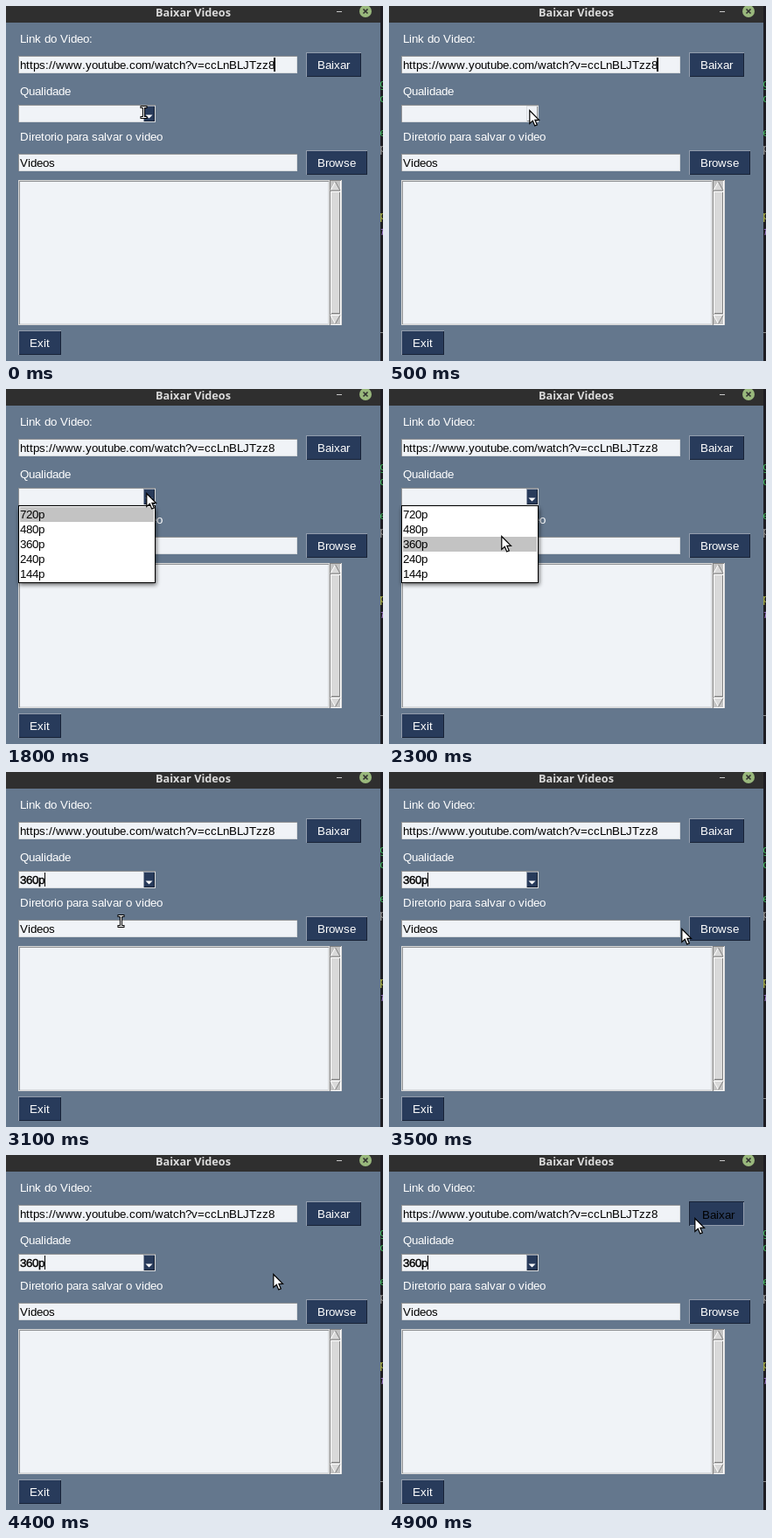
These frames come from a looping animation (431 px wide and 406 px high, 8000 ms). An HTML page:

```html
<!DOCTYPE html>
<html lang="pt">
<head>
<meta charset="utf-8">
<title>Baixar Videos</title>
<style>
html, body { margin: 0; width: 100%; height: 100%; overflow: hidden; background: #64778d; }
svg { display: block; width: 431px; height: 406px; }
rect, .edge { shape-rendering: crispEdges; }
text { font: 13.333px "Liberation Sans", Arial, sans-serif; fill: #000; white-space: pre; }
.label text, .button text { fill: #fff; }
.title { font: 700 12.7px "Noto Sans", "Open Sans", sans-serif; fill: #dadada; text-anchor: middle; }
.code text { font: 13px "DejaVu Sans Mono", monospace; fill: #3fae5a; }
.code .grey { fill: #9a9a9a; }
.code .olive { fill: #b5bd4c; }
.code .purple { fill: #9d78c9; font-style: italic; }
.field rect { fill: #f0f3f7; }
.button rect { fill: #283b5b; }
.edge { fill: none; stroke-width: 1; }
.dark { stroke: #909294; }
.light { stroke: #d8dbde; }
.navy-light { stroke: #939dad; }
.navy-dark { stroke: #182337; }
.bar-light { stroke: #fff; }
.bar-dark { stroke: #828282; }

/* One loop is 8 s, so 100 ms is 1.25%. */
.anim { animation: 8s step-end infinite; }
#pointer { animation-name: move; }
#beam { animation-name: beam; }
#arrow { animation-name: arrow; }
#urlCaret { animation-name: urlCaret; }
#comboCaret { animation-name: comboCaret; }
#comboHover { animation-name: comboHover; }
#chosen { animation-name: chosen; }
#menu { animation-name: menu; }
#row { animation-name: row; }
#exitText { animation-name: exitText; }
#loadText { animation-name: loadText; }
#pressed { animation-name: pressed; }

@keyframes move {
  0% { transform: translate(157px, 121px); }
  1.25% { transform: translate(158px, 118px); }
  2.5% { transform: translate(160px, 118px); }
  26.25% { transform: translate(154px, 131px); }
  27.5% { transform: translate(141px, 150px); }
  28.75% { transform: translate(128px, 167px); }
  38.75% { transform: translate(131px, 170px); }
  41.25% { transform: translate(160px, 173px); }
  42.5% { transform: translate(235px, 177px); }
  43.75% { transform: translate(334px, 178px); }
  45% { transform: translate(322px, 215px); }
  46.25% { transform: translate(290px, 255px); }
  47.5% { transform: translate(245px, 288px); }
  48.75% { transform: translate(194px, 304px); }
  50% { transform: translate(95px, 345px); }
  51.25% { transform: translate(19px, 377px); }
  52.5% { transform: translate(62px, 340px); }
  53.75% { transform: translate(180px, 240px); }
  55% { transform: translate(305px, 135px); }
  56.25% { transform: translate(381px, 42px); }
  57.5%, 100% { transform: translate(349px, 71px); }
}
@keyframes beam {
  0%, 38.75%, 45%, 52.5% { opacity: 1; }
  1.25%, 43.75%, 51.25%, 55%, 100% { opacity: 0; }
}
@keyframes arrow {
  0%, 38.75%, 45%, 52.5% { opacity: 0; }
  1.25%, 43.75%, 51.25%, 55%, 100% { opacity: 1; }
}
@keyframes urlCaret {
  0%, 6.25%, 18.75% { opacity: 1; }
  2.5%, 15%, 22.5%, 100% { opacity: 0; }
}
@keyframes comboCaret {
  0%, 45%, 57.5% { opacity: 0; }
  38.75%, 48.75%, 61.25%, 100% { opacity: 1; }
}
@keyframes comboHover {
  0%, 22.5%, 100% { opacity: 0; }
  1.25% { opacity: 1; }
}
@keyframes chosen {
  0% { opacity: 0; }
  38.75%, 100% { opacity: 1; }
}
@keyframes menu {
  0%, 38.75%, 100% { opacity: 0; }
  22.5% { opacity: 1; }
}
@keyframes row {
  0% { transform: none; }
  27.5% { transform: translateY(17px); }
  28.75%, 100% { transform: translateY(34px); }
}
@keyframes exitText {
  0%, 52.5%, 100% { fill: #fff; }
  51.25% { fill: #000; }
}
@keyframes loadText {
  0% { fill: #fff; transform: none; }
  57.5% { fill: #000; transform: none; }
  61.25%, 100% { fill: #000; transform: translate(2px, 1px); }
}
@keyframes pressed {
  0% { opacity: 0; }
  61.25%, 100% { opacity: 1; }
}
</style>
</head>
<body>
<svg viewBox="0 0 431 406">
  <defs>
    <filter id="blur" x="-20%" y="-20%" width="140%" height="140%"><feGaussianBlur stdDeviation="2.5"/></filter>
  </defs>

  <!-- Window and the editor behind it -->
  <rect width="431" height="406" fill="#64778d"/>
  <rect x="428" width="3" height="406" fill="#1d1c22"/>
  <g class="code">
    <text x="427" y="93">g</text>
    <text x="427" y="110">o</text>
    <text x="427" y="149">e</text>
    <text class="grey" x="427" y="167">p</text>
    <text class="olive" x="427" y="244">p</text>
    <text class="purple" x="427" y="262">f</text>
  </g>
  <rect x="428" y="373" width="3" height="1" fill="#8a8a8a"/>
  <rect width="428" height="19" fill="#2f2f2f"/>
  <text class="title" x="214" y="12">Baixar Videos</text>
  <rect x="378" y="6" width="6" height="1" fill="#c8c8c8"/>
  <circle cx="411" cy="6" r="7" fill="#99b87c"/>
  <path d="M408.500 3.500l5 5m0-5l-5 5" stroke="#2f2f2f" stroke-width="1.600"/>

  <g class="label">
    <text x="16" y="42">Link do Video:</text>
    <text x="16" y="102">Qualidade</text>
    <text x="16" y="154">Diretorio para salvar o video</text>
  </g>

  <!-- Text fields -->
  <g class="field">
    <rect x="14" y="57" width="319" height="20"/>
    <path class="edge light" d="M14 76.500H332.500V57"/>
    <path class="edge dark" d="M14.500 77V57.500H333"/>
    <text x="16" y="72">https://www.youtube.com/watch?v=ccLnBLJTzz8</text>
  </g>
  <g class="field">
    <rect x="14" y="169" width="319" height="20"/>
    <path class="edge light" d="M14 188.500H332.500V169"/>
    <path class="edge dark" d="M14.500 189V169.500H333"/>
    <text x="16" y="184">Videos</text>
  </g>
  <g id="urlCaret" class="anim"><rect x="306" y="59" width="2" height="16"/></g>

  <!-- Quality box -->
  <g class="field">
    <rect x="14" y="113" width="157" height="20"/>
    <path class="edge light" d="M14 132.500H170.500V113"/>
    <path class="edge dark" d="M14.500 133V113.500H171"/>
  </g>
  <g class="button">
    <rect x="157" y="114" width="13" height="18"/>
    <path class="edge navy-light" d="M157.500 132V114.500H170"/>
    <path class="edge navy-dark" d="M158 131.500H169.500V115"/>
  </g>
  <g id="comboHover" class="field anim">
    <rect x="157" y="114" width="13" height="18"/>
    <path class="edge light" d="M157.500 132V114.500H170"/>
    <path class="edge dark" d="M158 131.500H169.500V115"/>
  </g>
  <path d="M159.500 124.500h8l-4 4z" fill="#fff"/>
  <text id="chosen" class="anim" x="16" y="128" stroke="#000" stroke-width=".4">360p</text>
  <g id="comboCaret" class="anim"><rect x="44" y="115" width="1" height="16"/></g>

  <!-- Output box -->
  <rect x="14" y="199" width="370" height="166" fill="#d9d9d9"/>
  <g class="field">
    <rect x="15" y="200" width="354" height="164"/>
    <path class="edge light" d="M15 363.500H368.500V200"/>
    <path class="edge dark" d="M15.500 364V200.500H369"/>
  </g>
  <rect x="370" y="199" width="13" height="166" fill="#c3c3c3"/>
  <path class="edge bar-light" d="M370 364.500H382.500V199"/>
  <path class="edge bar-dark" d="M370.500 365V199.500H383"/>
  <rect x="371" y="212" width="11" height="140" fill="#d9d9d9"/>
  <path class="edge bar-light" d="M371.500 352V212.500H382"/>
  <path class="edge bar-dark" d="M372 351.500H381.500V213"/>
  <path d="M376.500 201L382 211H371z" fill="#d9d9d9"/>
  <path class="bar-light" d="M371 211L376.500 201"/>
  <path class="bar-dark" d="M376.500 201L382 211H371" fill="none"/>
  <path d="M371 353.500H382L376.500 363.500z" fill="#d9d9d9"/>
  <path class="bar-light" d="M382 353.500H371L376.500 363.500" fill="none"/>
  <path class="bar-dark" d="M376.500 363.500L382 353.500"/>

  <!-- Buttons -->
  <g class="button">
    <rect x="343" y="53" width="63" height="28"/>
    <path class="edge navy-light" d="M343.500 81V53.500H406"/>
    <path class="edge navy-dark" d="M344 80.500H405.500V54"/>
    <g id="pressed" class="anim">
      <path class="edge navy-dark" d="M343.500 81V53.500H406"/>
      <path class="edge navy-light" d="M344 80.500H405.500V54"/>
    </g>
    <text id="loadText" class="anim" x="374.500" y="72">Baixar</text>
  </g>
  <g class="button">
    <rect x="343" y="165" width="70" height="28"/>
    <path class="edge navy-light" d="M343.500 193V165.500H413"/>
    <path class="edge navy-dark" d="M344 192.500H412.500V166"/>
    <text x="378" y="184">Browse</text>
  </g>
  <g class="button">
    <rect x="14" y="371" width="49" height="28"/>
    <path class="edge navy-light" d="M14.500 399V371.500H63"/>
    <path class="edge navy-dark" d="M15 398.500H62.500V372"/>
    <text id="exitText" class="anim" x="38.500" y="390">Exit</text>
  </g>

  <!-- Drop-down list -->
  <g id="menu" class="anim">
    <rect x="15" y="137" width="157" height="87" fill="#000" opacity=".6" filter="url(#blur)"/>
    <rect x="14" y="133" width="157" height="89"/>
    <rect x="15" y="134" width="155" height="87" fill="#fff"/>
    <g id="row" class="anim"><rect x="16" y="135" width="153" height="17" fill="#c3c3c3"/></g>
    <text x="16" y="148">720p</text>
    <text x="16" y="165">480p</text>
    <text x="16" y="182">360p</text>
    <text x="16" y="199">240p</text>
    <text x="16" y="216">144p</text>
  </g>

  <!-- Mouse pointer -->
  <g id="pointer" class="anim">
    <g id="beam" class="anim" fill="none">
      <path d="M-3.500 -5.500H4.500M-3.500 6.500H4.500M.5 -5.500V6.500" stroke="#000" stroke-width="3"/>
      <path d="M-2.500 -5.500H3.500M-2.500 6.500H3.500M.5 -5.500V6.500" stroke="#fff" stroke-width="1"/>
    </g>
    <path id="arrow" class="anim" d="M.8 1.500V16.500L4.300 13.300L6.700 19L9.300 17.900L6.900 12.400H11.500z"
      fill="#fff" stroke="#000" stroke-width="1.200"/>
  </g>
</svg>
<script>
// The toolkit spaces its letters by whole pixels; buttons centre their labels.
const pen = document.createElement('canvas').getContext('2d');
pen.font = '13.333px "Liberation Sans", Arial, sans-serif';

function snap(text) {
  const widths = [...text.textContent].map(c => Math.round(pen.measureText(c).width));
  const total = widths.reduce((a, b) => a + b, 0);
  const centred = text.parentNode.classList.contains('button');
  let x = Math.round(+text.getAttribute('x') - (centred ? total / 2 : 0));
  text.setAttribute('x', widths.map(w => (x += w) - w).join(' '));
}

document.querySelectorAll('.label text, .field text, .button text, #menu text, #chosen').forEach(snap);
</script>
</body>
</html>
```
